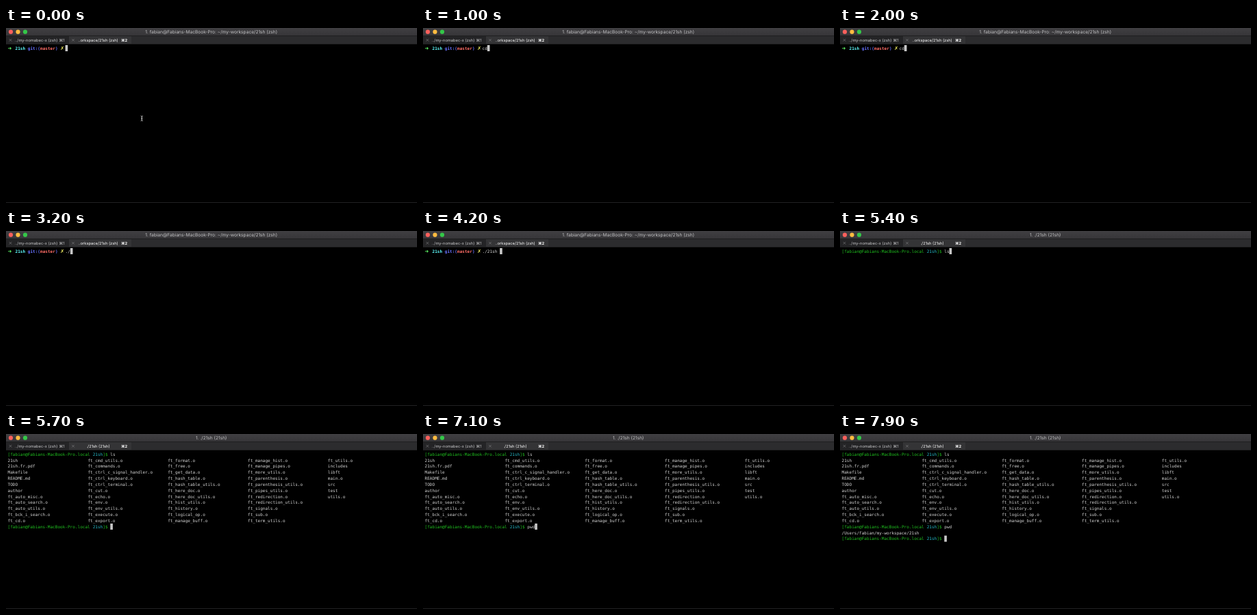
An HTML page that plays this animation: 600 by 256 pixels, repeating every 8 s.

```html
<!DOCTYPE html>
<html lang="en">
<head>
<meta charset="utf-8">
<title>Terminal</title>
<style>
  html, body { margin: 0; height: 100%; overflow: hidden; background: #000; }
  svg { display: block; width: 600px; height: 256px; }
  text { white-space: pre; text-rendering: geometricPrecision; }
  .ui { font: 5.75px Inter, "DejaVu Sans", sans-serif; fill: #c6c6c8; }
  .ui .on { fill: #fff; }
  .ui #title { font-size: 6.6px; fill: #c4c4c6; }
  .mid { text-anchor: middle; }
  #screen { font: 6.063px "DejaVu Sans Mono", monospace; fill: #c7c7c7; }
  .bold { font-weight: bold; }
  #screen .sign { font: 7px "DejaVu Sans", sans-serif; }
</style>
</head>
<body>
<svg viewBox="0 0 600 256">
  <defs>
    <linearGradient id="bar" x2="0" y2="1">
      <stop stop-color="#403f42"/><stop offset="1" stop-color="#363538"/>
    </linearGradient>
  </defs>
  <rect width="600" height="256"/>
  <rect width="600" height="12" fill="url(#bar)"/>
  <rect y="12" width="600" height="12" fill="#2c2c2e"/>
  <rect y="12" width="92" height="12" fill="#242426"/>
  <rect x="92" y="12" width="91" height="12" fill="#343436"/>
  <path d="M0 11.5H600M0 23.5H600" stroke="#1e1e1f"/>
  <rect y="255" width="600" height="1" fill="#222223"/>
  <circle cx="7" cy="5.7" r="3.1" fill="#fc605c"/>
  <circle cx="17.5" cy="5.7" r="3.1" fill="#fdbc40"/>
  <circle cx="28" cy="5.7" r="3.1" fill="#34c749"/>
  <path d="M4.7 15.9l3.6 3.6m0-3.6l-3.6 3.6M96.2 15.9l3.6 3.6m0-3.6l-3.6 3.6" stroke="#858587" stroke-width=".6"/>
  <g class="ui">
    <text id="title" class="mid" x="299.7" y="8.1"></text>
    <text x="13" y="19.7">../my-nomabec-x (zsh)</text>
    <text x="77.5" y="19.7">⌘1</text>
    <text id="tab" class="mid on" x="134.5" y="19.7"></text>
    <text class="on bold" x="168" y="19.7">⌘2</text>
  </g>
  <g id="screen"></g>
  <path id="mouse" d="M196.7 128.6q1.6 0 1.6 1.4v4.6q0 1.4-1.6 1.4M199.9 128.6q-1.6 0-1.6 1.4v4.6q0 1.4 1.6 1.4M197.3 132.6h2" fill="none" stroke="#c8c8c8" stroke-width=".8"/>
</svg>
<script>
const LOOP = 8000, CELL = 3.65, LINE = 8.83, LEFT = 2.6, TOP = 25;
const USER = 'fabian', HOST = 'Fabians-MacBook-Pro';
const $ = id => document.getElementById(id);

const columns = [
  '21sh 21sh.fr.pdf Makefile README.md TODO author ft_auto_misc.o ft_auto_search.o ft_auto_utils.o ft_bck_i_search.o ft_cd.o',
  'ft_cmd_utils.o ft_commands.o ft_ctrl_c_signal_handler.o ft_ctrl_keyboard.o ft_ctrl_terminal.o ft_cut.o ft_echo.o ft_env.o ft_env_utils.o ft_execute.o ft_export.o',
  'ft_format.o ft_free.o ft_get_data.o ft_hash_table.o ft_hash_table_utils.o ft_here_doc.o ft_here_doc_utils.o ft_hist_utils.o ft_history.o ft_logical_op.o ft_manage_buff.o',
  'ft_manage_hist.o ft_manage_pipes.o ft_more_utils.o ft_parenthesis.o ft_parenthesis_utils.o ft_pipes_utils.o ft_redirection.o ft_redirection_utils.o ft_signals.o ft_sub.o ft_term_utils.o',
  'ft_utils.o includes libft main.o src test utils.o'
].map(names => names.split(' '));

// [start time, typed text] for each prompt
const zshInput = [[0, ''], [900, 'c'], [1000, 'cd'], [1300, 'cd '], [2000, 'cd'], [2100, 'c'], [2200, ''],
  [3000, '.'], [3200, './'], [3800, './2'], [3900, './21'], [4200, './21sh ']];
const lsInput = [[0, ''], [5300, 'l'], [5400, 'ls']];
const pwdInput = [[0, ''], [6800, 'p'], [6900, 'pw'], [7000, 'pwd']];
const START = 4600, RENAMED = 5300, LISTED = 5700, PRINTED = 7400;

const typed = (keys, t) => keys.filter(k => k[0] <= t).pop()[1];

const put = (row, col, str, color = '#d6d6d6', cls = '') =>
  `<text x="${LEFT + col * CELL}" y="${TOP + 6.8 + row * LINE}" fill="${color}" class="${cls}">${str}</text>`;

const block = (row, col) =>
  `<rect x="${LEFT + col * CELL}" y="${TOP + row * LINE}" width="${CELL}" height="9"/>`;

function zshLine(input) {
  const parts = [[0, '➜', '#5ff967', 'sign'], [3, '21sh', '#5ffdff'], [8, 'git:(', '#6871ff'],
    [13, 'master', '#ff6d67'], [19, ')', '#6871ff'], [21, '✗', '#fefb67', 'sign']];
  return parts.map(([col, str, color, cls = 'bold']) => put(0, col, str, color, cls)).join('')
    + put(0, 23, input) + block(0, 23 + input.length);
}

function shLine(row, input, active) {
  const head = `[${USER}@${HOST}.local `, n = head.length;
  return put(row, 0, head, '#1fc01f') + put(row, n, '21sh', '#25bccb') + put(row, n + 4, ']$', '#1fc01f')
    + put(row, n + 7, input) + (active ? block(row, n + 7 + input.length) : '');
}

function screen(t) {
  if (t < START) return zshLine(typed(zshInput, t));
  let out = shLine(0, typed(lsInput, t), t < LISTED);
  if (t >= LISTED) {
    out += columns.map((names, c) => names.map((name, r) => put(r + 1, c * 32, name)).join('')).join('');
    out += shLine(12, typed(pwdInput, t), t < PRINTED);
  }
  if (t >= PRINTED) out += put(13, 0, `/Users/${USER}/my-workspace/21sh`) + shLine(14, '', true);
  return out;
}

let last = -1;
function draw(now) {
  const t = Math.floor(now % LOOP / 100) * 100;
  if (t !== last) {
    last = t;
    const job = t < RENAMED ? '(zsh)' : '(21sh)';
    $('title').textContent = t < START ? `1. ${USER}@${HOST}: ~/my-workspace/21sh (zsh)` : `1. ./21sh ${job}`;
    $('tab').textContent = t < START ? '..orkspace/21sh (zsh)' : `./21sh ${job}`;
    $('mouse').style.display = t < 900 ? '' : 'none';
    $('screen').innerHTML = screen(t);
  }
  requestAnimationFrame(draw);
}
draw(performance.now());
</script>
</body>
</html>
```
